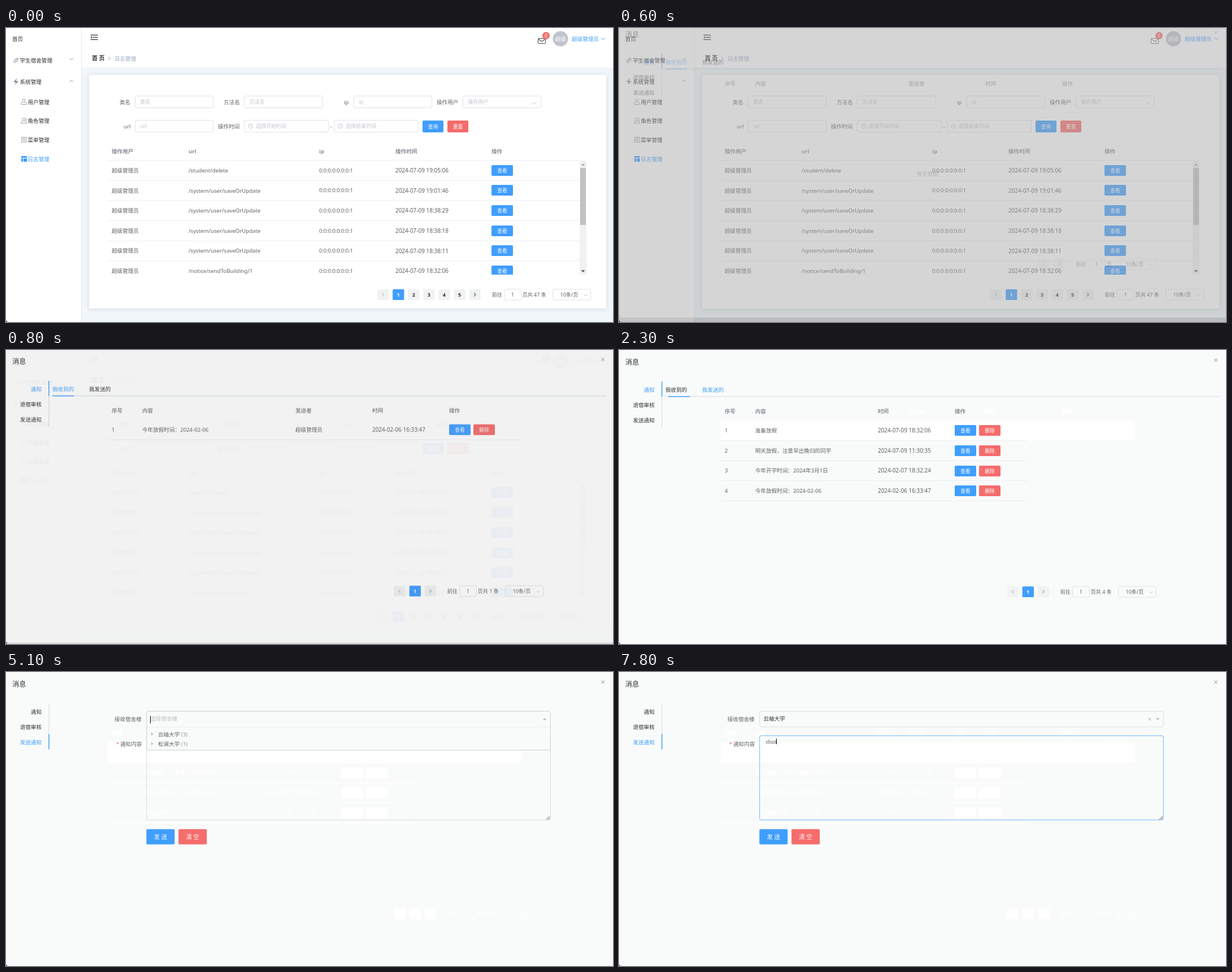
Recreate the animation shown at these times as an HTML page with a canvas. Size 1074 by 521 pixels, loop 8 s.

```html
<!DOCTYPE html>
<html lang="zh-CN">
<head>
<meta charset="utf-8">
<style>
html, body { margin: 0; width: 100%; height: 100%; overflow: hidden; background: #fff; }
canvas { position: absolute; left: 0; top: 0; }
#dialog { box-shadow: 0 2px #fff; }
</style>
</head>
<body>
<canvas id="page" width="1074" height="521"></canvas>
<canvas id="dialog" width="1074" height="521"></canvas>
<script>
const W = 1074, H = 521, LOOP = 8000;
const BLUE = '#409eff', RED = '#f56c6c', DARK = '#303133', TEXT = '#606266',
  HEAD = '#8b8e95', HINT = '#c0c4cc', EDGE = '#d4d8e0', LINE = '#ebeef5', PAPER = '#f9fbfa';
const FONT = '"Noto Sans", "Noto Sans CJK SC", sans-serif';
const pageEl = document.getElementById('page'), dialogEl = document.getElementById('dialog');
const pageCtx = pageEl.getContext('2d'), dialogCtx = dialogEl.getContext('2d');
let g = pageCtx, ghost = false;

const ink = c => ghost ? '#fff' : c;

function text(s, x, y, color = TEXT, size = 9.6, weight = 400, align = 'left', family = FONT) {
  g.font = `${weight} ${size}px ${family}`;
  g.fillStyle = ink(color);
  g.textAlign = align;
  g.fillText(s, x, y + size * 0.37);
  return g.measureText(s).width;
}

function rect(x, y, w, h, color, r = 0) {
  g.fillStyle = ink(color);
  g.beginPath();
  g.roundRect(x, y, w, h, r);
  g.fill();
}

function box(x, y, w, h, color = EDGE, r = 2.5) {
  g.strokeStyle = ink(color);
  g.lineWidth = 0.75;
  g.beginPath();
  g.roundRect(x + 0.5, y + 0.5, w - 1, h - 1, r);
  g.stroke();
}

function path(points, color, width = 1, fill = false) {
  g.beginPath();
  for (let i = 0; i < points.length; i += 2) g.lineTo(points[i], points[i + 1]);
  if (fill) {
    g.fillStyle = ink(color);
    g.fill();
  } else {
    g.strokeStyle = ink(color);
    g.lineWidth = width;
    g.stroke();
  }
}

function ring(x, y, rx, ry, color, tilt = 0, from = 0, to = 2 * Math.PI) {
  g.strokeStyle = color;
  g.lineWidth = 0.9;
  g.beginPath();
  g.ellipse(x, y, rx, ry, tilt, from, to);
  g.stroke();
}

const disc = (x, y, r, color) => rect(x - r, y - r, 2 * r, 2 * r, color, r);
// d: 1 points down or right, -1 points up or left
const chevron = (x, y, d, color = HINT, r = 3) => path([x - r, y - d * r / 2, x, y + d * r / 2, x + r, y - d * r / 2], color);
const sideChevron = (x, y, d, color, r = 3) => path([x - d * r / 2, y - r, x + d * r / 2, y, x - d * r / 2, y + r], color, 1.1);
const caretMark = (x, y, d, color) => path([x - 3.5, y - d * 1.8, x + 3.5, y - d * 1.8, x, y + d * 1.8], color, 1, true);

function button(s, x, y, w, h, color, size = 8.8) {
  rect(x, y, w, h, color, 2);
  text(s, x + w / 2, y + h / 2, '#fff', size, 400, 'center');
}

function cell(s, x, y) {
  const size = /^20/.test(s) ? 9.95 : /^0:/.test(s) ? 9.3 : 9.6;
  text(s, x, y, TEXT, size);
}

const headings = (names, cols, y) => names.forEach((s, i) => text(s, cols[i], y, HEAD, 9.6, 700));

function pager(right, y, pages, total) {
  const top = y - 9.5, label = total ? `页共 ${total} 条` : '页';
  const select = right - 67.5;
  g.font = `9px ${FONT}`;
  const labelX = select - 11.3 - g.measureText(label).width, input = labelX - 33, go = input - 21;
  const step = 27.1, start = go - 13 - step * (pages + 2);
  for (let i = 0; i < pages + 2; i++) {
    const x = start + i * step, active = i === 1 && pages;
    rect(x, top, 20.3, 19, active ? BLUE : '#f0f2f3', 1.5);
    if (i === 0) sideChevron(x + 10, y, -1, HINT);
    else if (i > pages) sideChevron(x + 10, y, 1, pages > 1 ? TEXT : '#a8abb2');
    else text(i, x + 10, y, active ? '#fff' : DARK, 9, 700, 'center');
  }
  text('前往', go, y, TEXT, 9);
  box(Math.round(input), top - 0.5, 31, 20);
  text('1', input + 15.5, y, TEXT, 9, 400, 'center');
  text(label, labelX, y, TEXT, 9);
  box(Math.round(select), top - 0.5, 68, 20);
  text('10条/页', select + 13.5, y, TEXT, 9);
  chevron(right - 9, y + 1, 1);
}

function corner() {
  path([0, 518, 3, 521, 0, 521], '#777', 1, true);
}

function field(label, labelX, x, y, w, hint, icon) {
  text(label, labelX, y);
  box(x, y - 11, w, 22);
  if (icon) {
    ring(x + 12, y, 3.8, 3.8, HINT);
    path([x + 12, y - 2.5, x + 12, y, x + 14, y], HINT, 0.8);
  }
  text(hint, x + (icon ? 21 : 9.5), y, HINT, 9);
}

function sidebar() {
  const gray = '#909399';
  text('首页', 11, 19, DARK);
  ring(17.5, 57.5, 5, 2.6, gray, -0.8);
  ring(18, 57, 3.2, 1, gray, -0.8);
  text('学生宿舍管理', 24.5, 57, DARK);
  chevron(115.5, 55, 1, gray);
  path([19, 89, 13, 96, 17, 96, 16, 101, 22, 94, 18, 94], gray, 1, true);
  text('系统管理', 24.5, 95, DARK);
  chevron(115.5, 94, -1, gray);
  [131, 164.5].forEach((y, i) => {
    ring(31.5, y - 2.3, 2.4, 2.8, gray);
    path([29.5, y + 0.5, 27, y + 2, 27, y + 4.5, 36, y + 4.5, 36, y + 2, 33.5, y + 0.5], gray, 0.9);
    if (i) path([35, y - 5, 36.5, y - 3, 35.5, y], gray, 0.9);
  });
  box(27, 193, 10, 10, gray, 0);
  for (let y = 195.5; y < 202; y += 2.3) path([29, y, 35, y], gray, 0.8);
  rect(27, 227, 10, 10, BLUE);
  rect(27, 230, 10, 1, '#fff');
  rect(30, 231, 1, 6, '#fff');
  ['用户管理', '角色管理', '菜单管理', '日志管理'].forEach((s, i) =>
    text(s, 38.5, 131 + i * 33.8, i === 3 ? BLUE : DARK));
}

function topBar(t) {
  for (const [y, x] of [[12.5, 149.5], [16.5, 154], [20.5, 149.5]]) path([x, y, 162.5, y], DARK, 1.3);
  path([149.5, 16.5, 152.5, 14.5, 152.5, 18.5], DARK, 1, true);
  text('首 页', 152, 53.5, DARK, 10, 700);
  sideChevron(183, 54, 1, HINT);
  text('日志管理', 192, 54, '#97a8be');

  const mail = t < 300 ? '#000' : t < 400 ? '#2a2a2a' : '#4a4a4a';
  box(941, 18, 14, 10, mail, 1);
  path([942, 19.5, 948, 24, 954, 19.5], mail);
  disc(955.5, 13.5, 6.5, RED);
  text('0', 955.5, 13.5, '#fff', 8.5, 400, 'center');
  disc(981, 19, 13.5, '#c0c4cc');
  text('超级', 981, 19, '#fff', 9.6, 400, 'center');
  text('超级管理员', 1001, 19, BLUE);
  chevron(1057, 19, 1, BLUE, 3.5);
}

function logTable() {
  const cols = [187, 323, 554, 689, 859];
  const save = '/system/user/saveOrUpdate';
  const rows = [['/student/delete', '19:05:06'], [save, '19:01:46'], [save, '18:38:29'],
    [save, '18:38:18'], [save, '18:38:11'], ['/notice/sendToBuilding/1', '18:32:06']];
  headings(['操作用户', 'url', 'ip', '操作时间', '操作'], cols, 218);
  g.save();
  g.beginPath();
  g.rect(180, 230, 850, 207);
  g.clip();
  rect(180, 234, 835, 1, LINE);
  rows.forEach(([url, time], i) => {
    const y = 252.3 + i * 35.65;
    ['超级管理员', url, '0:0:0:0:0:0:0:1', '2024-07-09 ' + time].forEach((s, c) => cell(s, cols[c], y));
    button('查看', 859, Math.round(y - 9.5), 38, 19, BLUE);
    rect(180, Math.round(y + 17.5), 835, 1, LINE);
  });
  rect(1015, 235, 12, 202, '#f1f1f1');
  rect(1016, 248, 10, 101, '#c1c1c1');
  caretMark(1021, 242, -1, '#a3a3a3');
  caretMark(1021, 431, 1, '#505050');
  g.restore();
}

function drawPage(t, shade) {
  g = pageCtx;
  rect(0, 0, W, H, '#fff');
  rect(133, 70, W - 133, H - 70, '#f0f6f9');
  rect(133, 0, 1, H, '#e6e8ea');
  g.save();
  g.shadowColor = 'rgba(0,0,0,.12)';
  g.shadowBlur = 8;
  g.shadowOffsetY = 1;
  rect(147, 83, 915, 414, '#fff', 2);
  g.restore();
  sidebar();
  topBar(t);

  field('类名', 201, 228, 131, 139, '类名');
  field('方法名', 385, 421, 131, 140, '方法名');
  field('ip', 598, 615, 131, 139, 'ip');
  field('操作用户', 762, 808, 131, 139, '操作用户');
  chevron(935, 133, 1, HINT, 3.5);
  field('url', 208, 228, 174, 139, 'url');
  field('操作时间', 375, 421, 174, 150, '选择开始时间', true);
  field('-', 573.5, 580, 174, 150, '选择结束时间', true);
  button('查询', 737, 164, 37, 21, BLUE);
  button('重置', 781, 164, 37, 21, RED);
  logTable();
  pager(1034.5, 472.5, 5, 47);
  corner();
  rect(0, 0, W, H, `rgba(0,0,0,${shade})`);
}

// cubic-bezier(.645, .045, .355, 1)
function ease(p) {
  if (p <= 0) return 0;
  if (p >= 1) return 1;
  const curve = (s, a, b) => 3 * a * s * (1 - s) ** 2 + 3 * b * s * s * (1 - s) + s ** 3;
  let lo = 0, hi = 1;
  while (hi - lo > 1e-4) {
    const mid = (lo + hi) / 2;
    if (curve(mid, 0.645, 0.355) < p) lo = mid; else hi = mid;
  }
  return curve(lo, 0.045, 1);
}
const slide = (t, start) => ease((t - start) / 300);

function actions(x, y) {
  button('查看', x, y - 9, 38, 19, BLUE);
  button('删除', x + 43, y - 9, 38, 19, RED);
}

function received(loaded) {
  const cols = [187, 241, 512, 648, 784];
  headings(['序号', '内容', '发送者', '时间', '操作'], cols, 108);
  if (!loaded) return text('暂无数据', 527, 268, '#909399');
  rect(180, 125, 732, 35, '#fff');
  if (ghost) return;
  ['1', '今年放假时间：2024-02-06', '超级管理员', '2024-02-06 16:33:47'].forEach((s, i) => cell(s, cols[i], 142));
  actions(784, 142);
  rect(180, 160, 732, 1, LINE);
}

function sent() {
  const cols = [187, 241, 458, 594];
  const rows = [['准备放假', '07-09 18:32:06'], ['明天放假，注意早出晚归的同学', '07-09 11:30:35'],
    ['今年开学时间：2024年3月1日', '02-07 18:32:24'], ['今年放假时间：2024-02-06', '02-06 16:33:47']];
  headings(['序号', '内容', '时间', '操作'], cols, 108);
  rows.forEach(([note, time], i) => {
    const y = 142.3 + i * 35.7;
    [i + 1, note, '2024-' + time].forEach((s, c) => cell(s, cols[c], y));
    actions(594, Math.round(y));
    rect(180, Math.round(y + 17.5), 542, 1, LINE);
  });
}

function review() {
  headings(['学生姓名', '申请人', '申请理由', '申请时间', '是否通过', '操作时间', '审核理由', '操作'],
    [138, 251, 361, 471, 580, 690, 800, 910], 108);
  rect(132, 124, 880, 1, LINE);
  rect(132, 410, 51, 1, LINE);
  rect(960, 410, 52, 1, LINE);
}

function topTabs(names, bar, blue) {
  names.forEach((s, i) => text(s, 82 + i * 65, 70, blue[i] ? BLUE : DARK));
  rect(82, 81.8, 980, 1.4, '#dfe4ed');
  rect(82 + 65 * bar, 81.8, 38.5, 1.4, BLUE);
}

function noteForm(t) {
  const open = t >= 5100 && t < 6200, chosen = t >= 6200;
  text('接收宿舍楼', 192, 83.5);
  text('*', 195, 127, RED);
  text('通知内容', 202, 127);

  const areaEdge = t < 4700 ? EDGE : t < 6600 ? '#cdd0d6' : t < 6700 ? '#a3b9d6' : t < 6800 ? '#6ca9ec' : BLUE;
  box(248.3, 112.4, 715.5, 150.2, areaEdge);
  path([956, 261.5, 962, 255.5], '#444');
  path([959.5, 261.5, 962, 259], '#444');
  if (t < 7600) text('输入通知内容', 259.5, 123.5, HINT);
  const typed = ['z', 'zhu', 'zhun'][Math.floor((t - 7600) / 100)] || (t >= 7600 ? 'zhun' : '');
  const end = 259.5 + text(typed, 259.5, 123, TEXT, 9.8, 400, 'left', '"Liberation Serif", serif');
  if (t >= 6600 && t < 7200 || typed) rect(Math.round(end - 0.5), 118, 1, 10, '#000');

  if (open) {
    rect(248.5, 69, 715, 70, PAPER, 3);
    rect(249, 97, 714, 1, '#eceeee');
    [['云岫大学', 3], ['松澜大学', 1]].forEach(([name, count], i) => {
      const y = 110 + 17 * i;
      path([257, y - 3, 260.5, y, 257, y + 3], '#bbb', 1, true);
      text(name, 269, y);
      text(`(${count})`, 310, y, '#909399');
    });
    if (t < 5500 || t >= 6000) rect(255, 78, 1, 13, '#000');
  }
  box(248.3, 69, 715.5, open ? 70 : 28.6, open ? '#c0c2c4' : '#d4d5d5', 3);
  text(chosen ? '云岫大学' : '选择宿舍楼', 255.5, 82, chosen ? '#333' : '#bdbdbd');
  caretMark(953, 83.5, open ? -1 : 1, '#bbb');
  if (chosen) {
    path([936.5, 81, 941.5, 86], '#aaa');
    path([941.5, 81, 936.5, 86], '#aaa');
  }
  button('发 送', 248.4, 278.6, 50, 27, BLUE, 10.4);
  button('清 空', 305.2, 278.6, 50, 27, RED, 10.4);
}

function drawDialog(t) {
  g = dialogCtx;
  rect(0, 0, W, H, t < 900 ? '#fff' : PAPER);
  text('消息', 11, 21, DARK, 12.2);
  path([1053, 15, 1059, 21], '#909399');
  path([1059, 15, 1053, 21], '#909399');

  ghost = true;
  if (t >= 2300) received(true);
  if (t >= 3300) {
    sent();
    pager(950.5, 428.5, 1, 4);
  }
  ghost = false;

  const active = t < 3300 ? 0 : t < 4200 ? 1 : 2;
  const hover = t >= 1600 && t < 2000 || t >= 2700 && t < 4100 ? 1 : t >= 4100 ? 2 : -1;
  ['通知', '退宿审核', '发送通知'].forEach((s, i) =>
    text(s, 63, 70 + 27 * i, i === active || i === hover ? BLUE : DARK, 9.6, 400, 'right'));
  rect(75.2, 56, 1.4, 81, '#dfe4ed');
  rect(75.2, 56 + 27 * ((t >= 3300 ? slide(t, 3215) : 0) + (t >= 4200 ? slide(t, 4115) : 0)), 1.4, 27, BLUE);

  if (active === 0) {
    const second = t >= 2300;
    topTabs(['我收到的', '我发送的'], second ? slide(t, 2230) : 0, [!second, t >= 2000]);
    if (second) sent(); else received(t >= 700);
    pager(950.5, 428.5, t < 700 ? 0 : 1, t < 700 ? 0 : second ? 4 : 1);
  } else if (active === 1) {
    topTabs(['我审核的', '我发起的'], 0, [true, false]);
    review();
  } else {
    noteForm(t);
  }
  corner();
}

// opening of the dialog: [opacity, lift, backdrop shade]
const opening = t => t < 600 ? [0, 0, 0] : t < 700 ? [0.3, 10, 0.23] : t < 800 ? [0.68, 4, 0.42] : t < 900 ? [0.9, 1.3, 0.5] : [1, 0, 0.5];

const began = performance.now();
let shown = -1;
function frame() {
  const t = Math.floor((performance.now() - began) % LOOP / 100) * 100;
  if (t !== shown) {
    shown = t;
    const [opacity, lift, shade] = opening(t);
    dialogEl.style.opacity = opacity;
    dialogEl.style.transform = `translateY(${-lift}px)`;
    if (opacity < 1) drawPage(t, shade);
    if (opacity) drawDialog(t);
  }
  requestAnimationFrame(frame);
}
frame();
</script>
</body>
</html>
```
